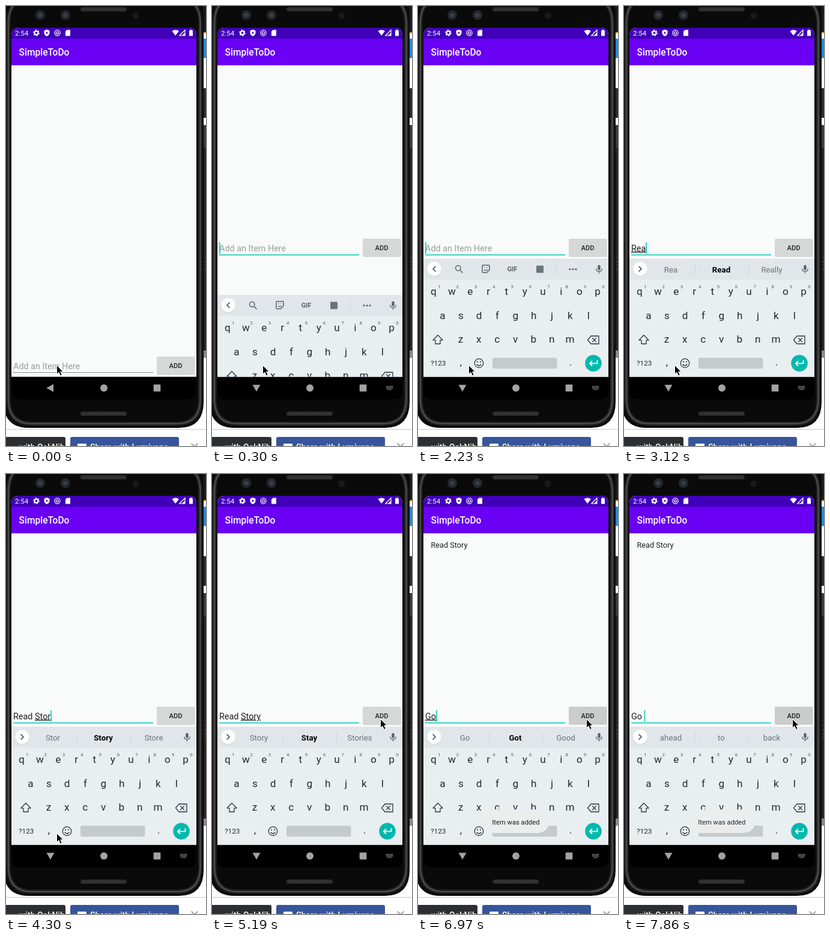
Write an HTML page that moves like this. It is 333x728 px and loops after 8 s.

```html
<!DOCTYPE html>
<html lang="en">
<head>
<meta charset="utf-8">
<title>To-do app demo</title>
<style>
  html, body { margin: 0; width: 100%; height: 100%; overflow: hidden; background: #fff; }
  svg { display: block; position: absolute; left: 0; top: 0; }
  text { font-family: Roboto, "Noto Sans", sans-serif; white-space: pre; }
  .mid { text-anchor: middle; }
  .line { fill: none; stroke-linecap: round; stroke-linejoin: round; }
  .key { font-size: 17.2px; fill: #1f2b33; }
  .num { font-size: 8px; fill: #56616a; }
  .word { font-size: 13.3px; fill: #69737a; }
  .bold { font-weight: 700; fill: #000; }
  .med { font-weight: 500; }
</style>
</head>
<body>
<svg width="333" height="728" viewBox="0 0 333 728">
  <defs>
    <clipPath id="screen"><path d="M9 613.5V49q0-13 13-13H304q13 0 13 13V613.5Z"/></clipPath>
  </defs>

  <!-- desktop behind the phone -->
  <g id="desktop">
    <rect x="318" width="15" height="43" fill="#1b1b1b"/>
    <rect x="318" y="43" width="15" height="2" fill="#e58a2b"/>
    <rect x="318" y="54" width="15" height="32" fill="#1a8cf0"/>
    <rect x="318" y="136" width="15" height="49" fill="#2c2c2e"/>
    <rect x="318" y="197" width="15" height="384" fill="#26221f"/>
    <rect x="318" y="197" width="15" height="38" fill="#3a3a3c"/>
    <path d="M331 416h2M331 423h2M331 429h2M331 436h2" stroke="#d33"/>
    <rect x="318" y="570" width="15" height="12" fill="#8a8a8a"/>
    <path d="M0 700.5H333" stroke="#c9c9c9"/>
    <rect x="-10" y="713" width="109" height="25" rx="3" fill="#2c2e31"/>
    <rect x="107" y="713" width="181" height="25" rx="3" fill="#37559b"/>
    <rect x="119" y="724" width="15" height="15" rx="1" fill="#fff"/>
    <g fill="#fff" font-size="14" class="med">
      <text x="22" y="734.5">with OakNib</text>
      <text x="140" y="734.5">Share with Lumivane</text>
    </g>
    <path class="line" d="M309 724l10 10M319 724l-10 10" stroke="#8b8b8b" stroke-width="1.5"/>
  </g>

  <!-- phone body -->
  <path d="M-4-10H324Q329 0 329 18V655Q329 698 288 698H38Q-4 698-4 655Z" fill="#0a0a0a"/>
  <path d="M14-3Q4 6 4 30V650Q4 691 42 691H285Q323.5 691 323.5 650V30Q323.5 6 313-3" fill="none" stroke="#1f1f1f" stroke-width="7"/>
  <path d="M14-3Q4 6 4 30V650Q4 691 42 691H285Q323.5 691 323.5 650V30Q323.5 6 313-3" fill="none" stroke="#4b4b4b" stroke-width="2.5"/>
  <path d="M9 600H317V637Q317 651 303 651H23Q9 651 9 637Z" fill="#000"/>
  <rect x="124" y="2" width="77" height="7" rx="3.5" fill="#2d2d2d"/>
  <rect x="124" y="671" width="77" height="7" rx="3.5" fill="#2d2d2d"/>
  <path d="M128 5.5h70M128 674.5h70" stroke="#454545" stroke-width="2" stroke-dasharray="1 2"/>
  <g fill="#24282d">
    <circle cx="57" cy="15" r="8"/><circle cx="99" cy="15" r="8"/>
    <circle cx="57" cy="15" r="3.5" fill="#3a4047"/><circle cx="99" cy="15" r="3.5" fill="#3a4047"/>
    <circle cx="216" cy="16" r="5.5" fill="#191919"/>
  </g>

  <g clip-path="url(#screen)">
    <rect x="9" y="36" width="308" height="578" fill="#f9fbfa"/>
    <rect x="9" y="36" width="308" height="18" fill="#4000b8"/>
    <rect x="9" y="54" width="308" height="44" fill="#6a00f4"/>
    <path d="M9 98.5H317" stroke="#000" opacity=".12"/>
    <g fill="#fff">
      <text x="15" y="48.5" font-size="11.5">2:54</text>
      <text x="21.5" y="82" font-size="15.6" class="med">SimpleToDo</text>
      <circle cx="50.5" cy="44.5" r="3" fill="none" stroke="#fff" stroke-width="2.2"/>
      <circle cx="50.5" cy="44.5" r="4.6" fill="none" stroke="#fff" stroke-width="1.6" stroke-dasharray="2.2 2.6"/>
      <path d="M68 39l4.5 1.8v3.4q0 3.8-4.5 5.8-4.5-2-4.5-5.8v-3.4Z"/>
      <path d="M66.8 42.2v4.4l3.4-2.2Z" fill="#4000b8"/>
      <circle cx="85.5" cy="44.5" r="4.6" fill="none" stroke="#fff" stroke-width="1.2"/>
      <circle cx="85.5" cy="44.5" r="2" fill="none" stroke="#fff" stroke-width="1.2"/>
      <path d="M101.5 39.5h5.5v10h-8v-7.5Z"/>
      <path d="M276.5 41.5q5.7-4 11.4 0l-5.7 7.5Z"/>
      <path d="M298 39.8v9.2h-9.2Z" fill="none" stroke="#fff" stroke-width="1.2"/>
      <path d="M298 44v5h-5Z"/>
      <path d="M305 40.5h1.5v-1.2h3v1.2h1.5v9h-6Z"/>
    </g>
    <text id="item" x="21.5" y="121.5" font-size="12.7" fill="#202020">Read Story</text>

    <g id="entry">
      <text id="field" x="12" y="405.5" font-size="14.4"></text>
      <rect id="under" x="12" y="411" width="233"/>
      <rect id="caret" y="391" width="1.7" height="19" fill="#13cdbc"/>
      <rect x="251" y="386.5" width="63.5" height="28.5" rx="2" fill="#000" opacity=".18"/>
      <rect id="button" x="251" y="385" width="63" height="29" rx="2"/>
      <text x="282.6" y="403.5" font-size="11.2" class="mid med" fill="#202020">ADD</text>
    </g>

    <g id="board">
      <rect x="9" y="418" width="308" height="196" fill="#e9eef1"/>
      <rect x="9" y="418" width="308" height="35" fill="#e1e6ea"/>
      <circle cx="27" cy="436" r="12" fill="#000" opacity=".08"/>
      <circle cx="27" cy="435" r="11.7" fill="#fff"/>
      <path id="chevron" class="line" stroke="#3d474e" stroke-width="1.6"/>
      <g fill="#58636b">
        <rect x="299.3" y="428.5" width="4.4" height="8.5" rx="2.2"/>
        <path class="line" d="M296.8 435q0 4.2 4.7 4.2t4.7-4.2M301.5 439.5v2.5" stroke="#58636b" stroke-width="1.3"/>
      </g>
      <g id="tools" fill="none" stroke="#58636b" stroke-width="1.5">
        <circle cx="66.8" cy="433.8" r="4.2"/><path d="M70 437l4.5 4.5"/>
        <path d="M107 430q0-1.2 1.2-1.2h9.6q1.2 0 1.2 1.2v6.5l-4.5 4.5h-6.3q-1.2 0-1.2-1.2Z"/>
        <path d="M110 432.5h1.5M114.5 432.5h1.5M110 436q3 3 6 0" stroke-width="1.2"/>
        <text x="157" y="439.2" font-size="11" class="mid" font-weight="700" fill="#58636b" stroke="none">GIF</text>
        <rect x="197" y="429.5" width="12" height="12" rx="1" fill="#6b757c" stroke="none"/>
        <path d="M230.5 426v18" stroke="#cfd5d9" stroke-width="1"/>
        <g fill="#58636b" stroke="none"><circle cx="253" cy="435.5" r="1.6"/><circle cx="258" cy="435.5" r="1.6"/><circle cx="263" cy="435.5" r="1.6"/></g>
      </g>
      <g id="words">
        <path d="M118.5 428v16M207.5 428v16" stroke="#cdd3d7"/>
        <text class="word mid" x="78" y="440.5"></text>
        <text class="word mid" x="162" y="440.5"></text>
        <text class="word mid" x="246" y="440.5"></text>
      </g>
      <g id="keys"></g>
      <g class="line" stroke="#2b373f" stroke-width="1.3">
        <path d="M33 544.5l8 8.3h-4v6.2h-8v-6.2h-4Z"/>
        <path d="M288 546h13v13h-13l-5.5-6.5ZM290.5 549.5l6 6M296.5 549.5l-6 6"/>
        <circle cx="101.5" cy="591" r="7.3"/><path d="M98 593q3.5 4 7 0"/>
        <path d="M99 588.5v.3M104 588.5v.3" stroke-width="2"/>
      </g>
      <text x="21" y="595" font-size="11.8" fill="#1f2b33">?123</text>
      <rect x="124" y="582" width="107.5" height="18" rx="3" fill="#c5cacd"/>
      <circle cx="292" cy="591" r="13.8" fill="#00b9ae"/>
      <path class="line" d="M298.5 587v4.3H286M289.5 587.6l-3.7 3.7 3.7 3.7" stroke="#fff" stroke-width="1.8"/>
    </g>

    <g id="toast">
      <rect x="107" y="555" width="112" height="39" rx="19.5" fill="#eceeee"/>
      <text x="123.3" y="580" font-size="11.2" fill="#1c1c1c">Item was added</text>
    </g>
  </g>

  <!-- navigation bar -->
  <g fill="#a3a3a3">
    <path id="back"/>
    <circle cx="163" cy="632" r="6"/>
    <rect x="245.7" y="626.2" width="11.6" height="11.6" rx="1"/>
    <path id="switcher" d="M290 629.5h12M290 632h12M292.4 634.5h7.2" stroke="#a3a3a3" stroke-width="1.5" stroke-dasharray="1.6 .8"/>
  </g>

  <path id="mouse" d="M0 0V14.6L3.4 11.5 6 17.2 8.7 16 6.2 10.5H10.8Z" fill="#000" stroke="#fff" stroke-width="1"/>
</svg>
<script>
const $ = id => document.getElementById(id);
const LOOP = 8000, LIFT = 195;

const key = (c, x, y, cls = "key") => `<text class="${cls} mid" x="${x}" y="${y}">${c}</text>`;
const row = (chars, x, y) => [...chars].map((c, i) => key(c, x + i * 30.35, y)).join("");
$("keys").innerHTML =
  row("qwertyuiop", 26, 478) + row("asdfghjkl", 41, 517.5) + row("zxcvbnm", 71, 557) +
  [..."1234567890"].map((c, i) => key(c, 35.3 + i * 30.35, 466.5, "num")).join("") +
  key(",", 71.5, 595) + key(".", 254, 595);

const start = {
  up: false, focus: false, slide: 196, done: "", typing: "", caret: false,
  words: null, plain: false, empty: false, item: false, button: "#d6d8d8", toast: 0, mouse: [84.5, 594.5]
};

// Typing a word: one letter per step, with its suggestions.
const type = (times, word, hints) => times.map((t, i) => [t, {
  typing: word.slice(0, i + 1), words: hints[i].split(" "), plain: false, empty: false, caret: true
}]);

const events = [
  [150, { focus: true, caret: true }],
  [300, { up: true, slide: 60 }],
  [450, { slide: 0 }],
  [740, { caret: false }],
  [1190, { caret: true }],
  [1630, { caret: false }],
  [2230, { caret: true }],
  [2670, { caret: false }],
  ...type([2820, 2970, 3120, 3410], "Read", ["R Re Really", "Re Red Really", "Rea Read Really", "Read Ready Reading"]),
  [3560, { done: "Read ", typing: "", words: ["the", "it", "more"], plain: true }],
  ...type([3850, 4000, 4150, 4300, 4450], "Story",
    ["S So See", "St Still Stay", "Sto Stop Store", "Stor Story Store", "Story Stay Stories"]),
  [4750, { mouse: [112, 570] }],
  [4900, { mouse: [190, 490] }],
  [5040, { mouse: [262, 420], caret: false }],
  [5190, { mouse: [280.5, 405.5] }],
  [5490, { button: "#c3c5c5", caret: true }],
  [5640, { item: true, done: "", typing: "", empty: true, words: null }],
  [5790, { toast: .15 }],
  [5930, { toast: .42, button: "#cbcdcd" }],
  [6080, { toast: .8 }],
  [6220, { toast: 1, caret: false }],
  ...type([6820, 6970], "Go", ["G Go Got", "Go Got Good"]),
  [7270, { done: "Go ", typing: "" }],
  [7420, { words: ["ahead", "to", "back"], plain: true }],
  [7860, { toast: .95 }]
];

const show = (id, on) => $(id).setAttribute("visibility", on ? "visible" : "hidden");
const set = (id, attrs) => { for (const k in attrs) $(id).setAttribute(k, attrs[k]); };
const wordNodes = document.querySelectorAll("#words text");

function draw(t) {
  const s = Object.assign({}, start, ...events.filter(e => e[0] <= t).map(e => e[1]));
  const text = s.done + s.typing;

  set("entry", { transform: `translate(0 ${s.up ? 0 : LIFT})` });
  set("field", { fill: text ? "#202020" : "#9b9d9d" });
  $("field").innerHTML = text
    ? `<tspan>${s.done}</tspan><tspan text-decoration="underline">${s.typing}</tspan>`
    : "Add an Item Here";
  set("caret", { x: 12 + (text ? $("field").getComputedTextLength() : 0) });
  show("caret", s.caret);
  set("under", s.focus ? { height: 1.6, fill: "#13cdbc" } : { height: 1, fill: "#8b8d8d" });
  set("button", { fill: s.button });

  const tools = !s.words && !s.empty;
  set("board", { transform: `translate(0 ${s.slide})` });
  set("chevron", { d: tools ? "M29 431l-4 4 4 4" : "M25 431l4 4-4 4" });
  show("tools", tools);
  show("words", s.words);
  wordNodes.forEach((n, i) => {
    n.textContent = s.words ? s.words[i] : "";
    n.classList.toggle("bold", i === 1 && !s.plain);
  });

  show("item", s.item);
  set("toast", { opacity: s.toast });
  set("back", { d: s.up ? "M67.5 626.8H80.5L74 638Z" : "M79 625.5V638.5L67.5 632Z" });
  show("switcher", s.up);
  set("mouse", { transform: `translate(${s.mouse})` });
}

let last = -1;
function tick() {
  const t = performance.now() % LOOP;
  const step = events.filter(e => e[0] <= t).length;
  if (step !== last) draw(t);
  last = step;
  requestAnimationFrame(tick);
}
tick();
</script>
</body>
</html>
```
